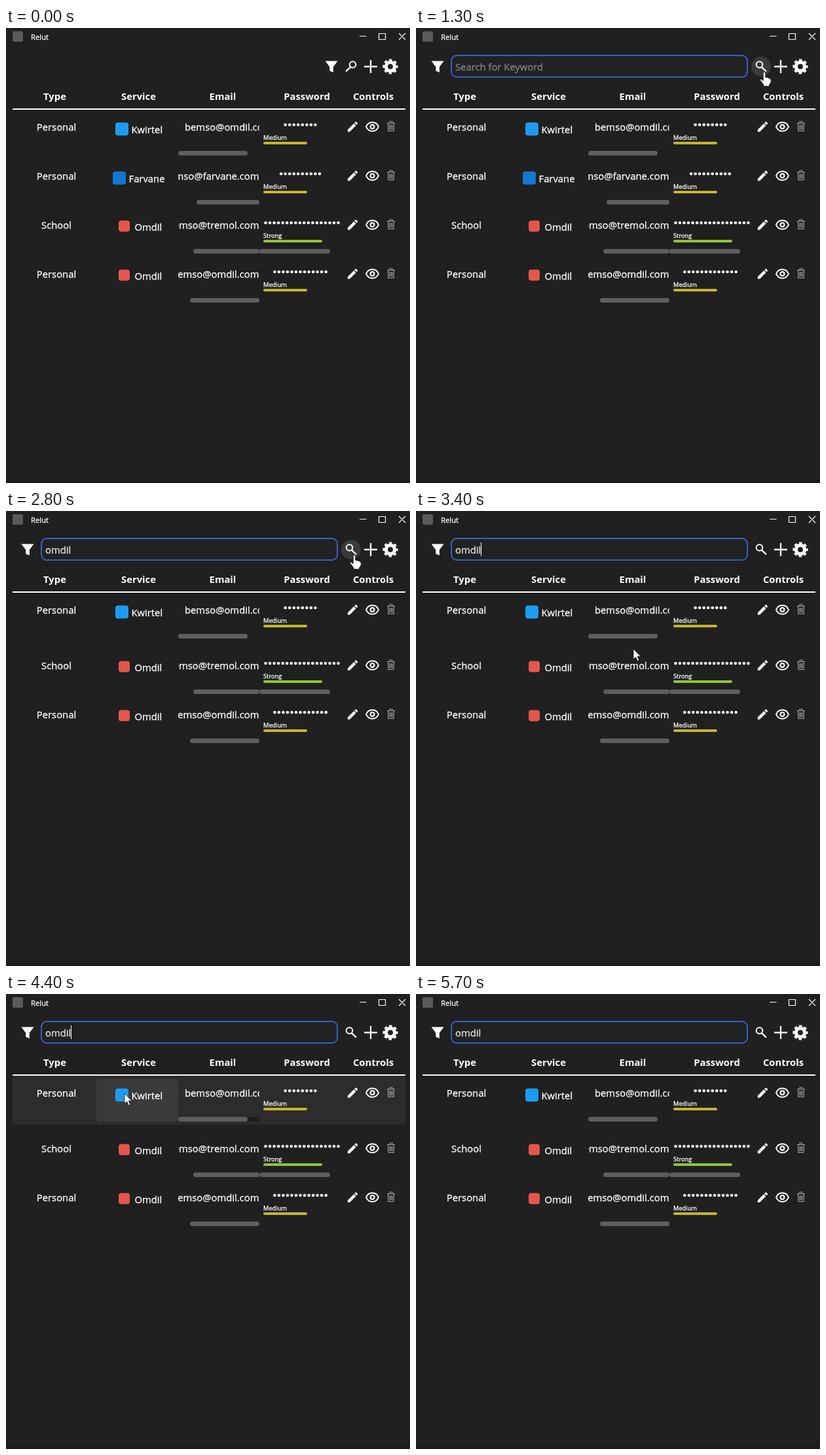
Write an HTML page that moves like this. It is 617 by 696 pixels and loops after 5800 ms.

```html
<!DOCTYPE html>
<html lang="en">
<head>
<meta charset="utf-8">
<title>Password list</title>
<style>
  html, body { margin: 0; width: 100%; height: 100%; overflow: hidden; background: #202020; }
  svg { display: block; }
  text {
    font: 14.8px "Open Sans", "Noto Sans", sans-serif; white-space: pre;
    color: #fff; fill: currentColor; stroke: currentColor; stroke-width: .3;
  }
  .head { font-weight: 700; text-anchor: middle; stroke: none; }
  .small { font-size: 9.3px; }
  .title { font-size: 11.3px; }
  .mid { text-anchor: middle; }
  .end { text-anchor: end; }
  .line { fill: none; stroke: #fff; }
  .bin { fill: none; stroke: #a6a6a6; stroke-width: 1.1; }
  .dots { stroke: #fff; stroke-width: 4.6; stroke-linecap: round; stroke-dasharray: 0 6.53; }
  #hint { color: #838383; }
  #typed { color: #e6e6e6; }
</style>
</head>
<body>
<svg width="617" height="696" viewBox="0 0 617 696">
  <rect width="617" height="696" fill="#202020"/>
  <rect y="691" width="617" height="5" fill="#1b1b1b"/>

  <rect x="10" y="5" width="16" height="16" rx="2" fill="#5a5a5a"/>
  <text class="title" x="38" y="18">Relut</text>
  <path class="line" stroke-width="1.2" d="M540 12.5h10.5M569.5 8.5h10v9h-10zM600 8l10 10M610 8l-10 10"/>

  <g id="field">
    <rect id="box" y="42" height="33" rx="8" fill="#222" stroke="#3263c4" stroke-width="2"/>
    <text id="hint" y="65">Search for Keyword</text>
    <text id="typed" x="60" y="65"></text>
    <rect id="caret" y="48" width="1" height="21" fill="#fff"/>
  </g>

  <path id="funnel" d="M-9.5-8.5H9.5L2.8 .5V9L-2.8 6.5V.5Z" fill="#fff"/>
  <circle id="halo" cx="527" cy="59" r="15" fill="#3a3a3a"/>
  <g id="lens" class="line" stroke-width="2">
    <circle cx="-2.5" cy="-3" r="4.8"/><path d="M1 .8L8 7.5" stroke-width="2.4"/>
  </g>
  <path class="line" stroke-width="2.3" d="M547 59h20M557 49v20"/>
  <g class="line">
    <circle cx="587" cy="59" r="6.6" stroke-width="5.2"/>
    <circle cx="587" cy="59" r="9.6" stroke-width="4" stroke-dasharray="4.2 3.34" stroke-dashoffset="2.1"/>
  </g>

  <g id="heads"></g>
  <rect x="10" y="123" width="600" height="2" fill="#fff"/>
  <g id="rows"></g>

  <path id="arrow" d="M0 0V16L3.7 12.5 6.2 18.3 8.7 17.2 6.2 11.6H11.2Z" fill="#fff" stroke="#111" stroke-width=".8"/>
  <path id="hand" d="M-1.8 2a1.8 1.8 0 0 1 3.6 0V8.5q3-1 3.4.9 2.6-.5 3 1 2 0 2 2V16L7.5 20v2H-1V20L-6.3 13q-.6-2 1.2-2L-1.8 13.5Z" fill="#fff" stroke="#111" stroke-width=".8"/>
</svg>
<script>
const $ = id => document.getElementById(id);
const LOOP = 5800, STEP = 100;
const TOP = 125, PITCH = 75, GAP = 10, QUERY = 'omdil';

// Static parts

const heads = { Type: 74.5, Service: 202.5, Email: 331, Password: 459.5, Controls: 561 };
$('heads').innerHTML = Object.entries(heads)
  .map(([name, x]) => `<text class="head" x="${x}" y="110">${name}</text>`).join('');

const services = {
  Kwirtel: { x: 167, size: 20, color: '#1d9bf0' },
  Farvane: { x: 163, size: 20, color: '#1278d2' },
  Omdil: { x: 172, size: 17, color: '#e4564c' }
};
const levels = {
  Medium: { color: '#c8b42c', width: 67 },
  Strong: { color: '#8cc832', width: 90 }
};
const entries = [
  { type: 'Personal', service: 'Kwirtel', host: 'omdil', bar: 106, dots: 8, level: 'Medium' },
  { type: 'Personal', service: 'Farvane', host: 'farvane', bar: 96, dots: 10, level: 'Medium' },
  { type: 'School', service: 'Omdil', host: 'tremol', bar: 101, dots: 18, level: 'Strong' },
  { type: 'Personal', service: 'Omdil', host: 'omdil', bar: 106, dots: 13, level: 'Medium' }
];

const tools = `
  <path transform="translate(519.3 15.8) scale(.85)" fill="#fff" d="M3 17.25V21h3.75L17.81 9.94l-3.75-3.75zM20.71 7.04a1 1 0 0 0 0-1.41l-2.34-2.34a1 1 0 0 0-1.41 0l-1.83 1.83 3.75 3.75z"/>
  <g class="line" stroke-width="2"><path d="M550 26c3.5-9 15.5-9 19 0-3.5 9-15.5 9-19 0z"/><circle cx="559.5" cy="26" r="3"/></g>
  <path class="bin" d="M582 20.5h12M586 20v-2h4v2M583.5 21l.5 11.5h8l.5-11.5M586 23v7.5M588 23v7.5M590 23v7.5"/>`;

const scrollbar = (x, size, from, width) => [[x, size, '#1e1e1e'], [from, width, '#5e5e5e']]
  .map(([x, w, color]) => `<rect x="${x}" y="63" width="${w}" height="7" rx="3.5" fill="${color}"/>`).join('');

const glow = (id, x, y, w, h, color) =>
  `<rect id="${id}" x="${x}" y="${y}" width="${w}" height="${h}" rx="4" fill="${color}"/>`;

function rowMarkup(e, i) {
  const s = services[e.service], level = levels[e.level];
  const first = i === 0, long = e.dots > 16;
  const span = (e.dots - 1) * 6.53, from = (long ? 452 : 449.5) - span / 2;
  const mid = s.size / 2 + 19.5;
  return `<g id="row${i}">
    ${first ? glow('rowGlow', 10, 0, 600, 75, '#2c2c2c') + glow('serviceGlow', 138, 5, 125, 65, '#3a3a3a') +
      glow('mailGlow', 263, 5, 124, 65, '#3a3a3a') : ''}
    <svg id="body${i}" width="617" height="${PITCH}">
      <text class="mid" x="77" y="32">${e.type}</text>
      <rect x="${s.x}" y="${mid - s.size / 2}" width="${s.size}" height="${s.size}" rx="4" fill="${s.color}"/>
      <text x="${s.x + 24.5}" y="${mid + 6.5}">${e.service}</text>
      <svg x="263" width="124" height="62">
        <text ${first ? 'x="10"' : 'class="end" x="123.5"'} y="32">bemso@${e.host}.com</text>
      </svg>
      <path class="dots" d="M${from} 23h${span + .1}"/>
      <text class="small" x="393" y="45.5">${e.level}</text>
      <rect x="393" y="49" width="${level.width}" height="4" rx="2" fill="${level.color}"/>
    </svg>
    <g id="bars${i}">
      ${scrollbar(263, 124, first ? 263 : 387 - e.bar, e.bar)}
      ${long ? scrollbar(387, 124, 387, 108) : ''}
    </g>${tools}</g>`;
}
$('rows').innerHTML = `<rect id="flash" x="10" y="${TOP + PITCH}" width="600" rx="5" fill="#dc2838"/>` +
  entries.map(rowMarkup).join('');

// Motion

const ramp = (t, from, to) => Math.min(1, Math.max(0, (t - from) / (to - from)));
const pulse = (t, on, off) => ramp(t, on, on + 200) * (1 - ramp(t, off, off + 200));
const easeOut = u => 1 - (1 - u) ** 2;
const smooth = u => u * u * (3 - 2 * u);
const mix = (a, b, u) => a + (b - a) * u;

// Pointer stops: time, x, y
const stops = [
  [300, 364, 109], [800, 532, 67], [3100, 532, 67], [3300, 576, 254], [3500, 88, 168],
  [3700, 343, 148], [3850, 372, 174], [4300, 181, 152], [4900, 181, 152], [5100, 566, 248]
];
function pointer(t) {
  const i = stops.findIndex(s => s[0] >= t);
  if (i < 0 || t < stops[0][0]) return null;
  const a = stops[Math.max(0, i - 1)], b = stops[i];
  const u = i ? smooth(ramp(t, a[0], b[0])) : 0;
  return [mix(a[1], b[1], u), mix(a[2], b[2], u)];
}

// The caret stays lit while typing, then blinks.
function caretOn(t) {
  const idle = t < 1800 ? t - 800 : Math.max(0, t - 2250);
  return idle % 960 < 480;
}

const set = (id, attrs) => {
  for (const k in attrs) $(id).setAttribute(k, attrs[k]);
};
const show = (id, on) => set(id, { display: on ? 'inline' : 'none' });
const move = (id, x, y) => set(id, { transform: `translate(${x} ${y})` });

function drawSearch(t) {
  const open = easeOut(ramp(t, 800, 1000)), left = mix(517, 53, open);
  show('field', open > 0);
  set('box', { x: left + 1, width: Math.max(0, 505 - left) });
  set('hint', { x: left + 7 });
  move('funnel', left - 20, 59);
  set('lens', { transform: `translate(527 59) scale(${mix(-1, 1, open)} 1)` });
  set('halo', { opacity: pulse(t, 600, 3100) });

  const word = QUERY.slice(0, Math.max(0, Math.floor((t - 1670) / 125)));
  $('typed').textContent = word;
  show('hint', !word);
  show('caret', caretOn(t));
  set('caret', { x: Math.round(60 + (word && $('typed').getComputedTextLength())) });
}

function drawRows(t) {
  const u = ramp(t, 1750, 2050), fade = 1 - u;
  const height = mix(PITCH, GAP, easeOut(u)), shift = height - PITCH;
  entries.forEach((e, i) => move('row' + i, 0, TOP + PITCH * i + (i > 1 ? shift : 0)));
  set('row1', { opacity: fade });
  set('body1', { height });
  move('bars1', 0, shift * .88);
  set('flash', { height, opacity: fade * u });

  set('rowGlow', { opacity: pulse(t, 3400, 5000) });
  set('mailGlow', { opacity: pulse(t, 3600, 4000) });
  set('serviceGlow', { opacity: Math.max(pulse(t, 3450, 3550), pulse(t, 4050, 4950)) });
}

function drawPointer(t) {
  const spot = pointer(t), overLens = t >= 700 && t < 3200;
  show('arrow', spot && !overLens);
  show('hand', spot && overLens);
  if (spot) move(overLens ? 'hand' : 'arrow', ...spot);
}

const began = performance.now();
function tick() {
  const now = (performance.now() - began) % LOOP;
  const t = Math.floor(now / STEP) * STEP;
  drawSearch(t);
  drawRows(t);
  drawPointer(t);
  requestAnimationFrame(tick);
}
tick();
</script>
</body>
</html>
```
